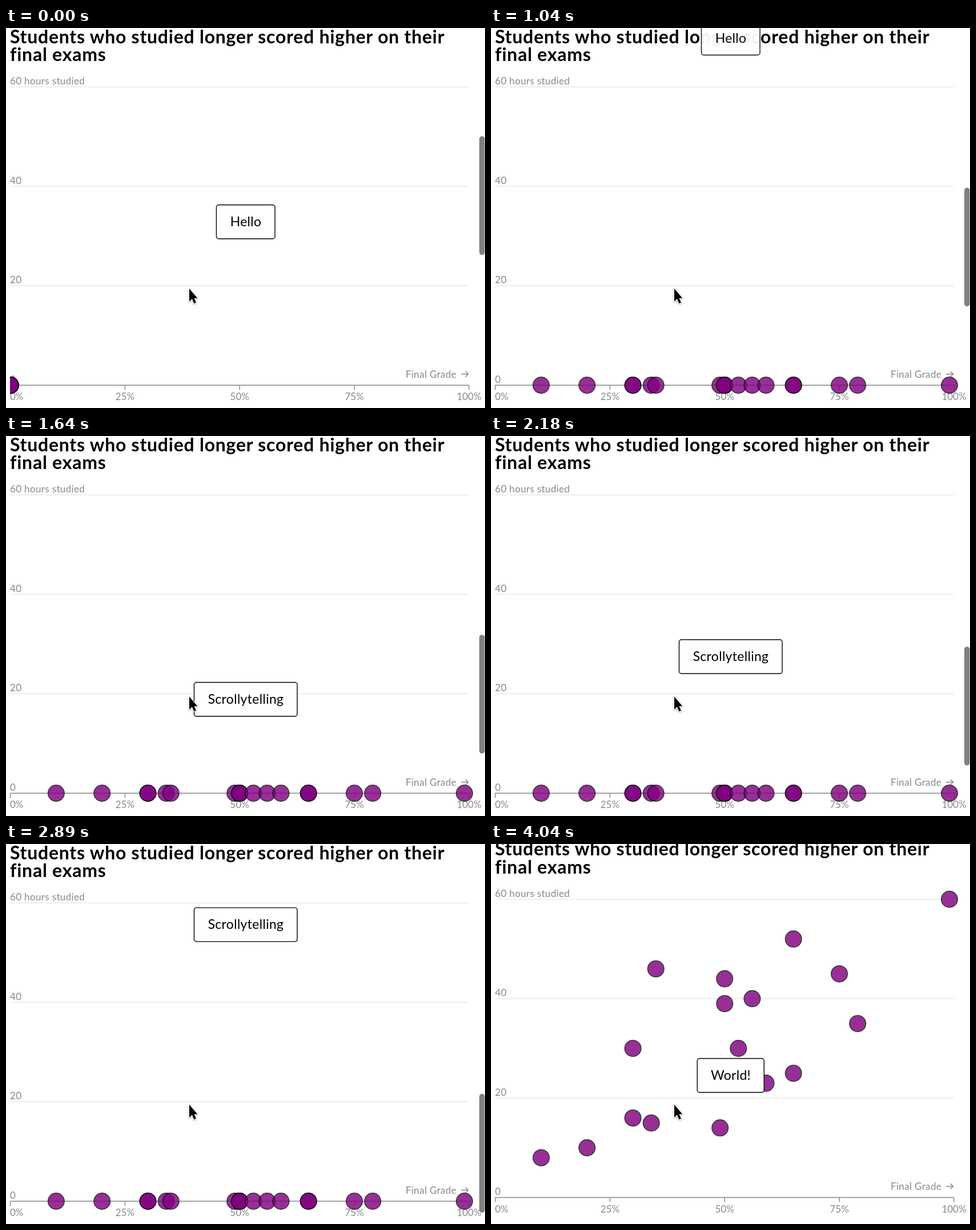
Animation of 839x667 px, one loop 5440 ms. Source, as an HTML page:

```html
<!DOCTYPE html>
<html lang="en">
<head>
<meta charset="utf-8">
<title>Study time and grades</title>
<style>
  html, body { margin: 0; width: 100%; height: 100%; overflow: hidden; background: #fff; }
  svg { display: block; width: 100%; height: 100%; font-family: Lato, "Open Sans", sans-serif; }
  .title { font-size: 32px; font-weight: 700; letter-spacing: .75px; }
  .label { font-size: 17px; fill: #88888c; }
  .spaced { letter-spacing: .35px; }
  .grid { stroke: #e0e0e0; stroke-width: 1.2; }
  .axis { stroke: #85858a; stroke-width: 1.4; fill: none; }
  .dot { fill: purple; stroke: #000; stroke-width: 1.4; opacity: .81; }
  .step rect { fill: #fff; stroke: #000; stroke-width: 1.4; }
  .step text { font-size: 23px; letter-spacing: .3px; text-anchor: middle; }
  .cursor { stroke: #fff; stroke-width: 2.2; stroke-linejoin: round; paint-order: stroke;
            filter: drop-shadow(0 1.5px 1.5px rgba(0, 0, 0, .35)); }
</style>
</head>
<body>
<svg viewBox="0 0 839 667">
  <clipPath id="plot"><rect x="7" y="0" width="832" height="667"/></clipPath>
  <g id="chart">
    <text class="title" x="7" y="26.5">Students who studied longer scored higher on their</text>
    <text class="title" x="7" y="58">final exams</text>
    <g id="axes"></g>
    <text class="label spaced" x="700" y="613.5">Final Grade</text>
    <path class="axis" d="M797 607.5h12.5m-5-5l5 5l-5 5"/>
    <g id="dots" clip-path="url(#plot)"></g>
  </g>
  <g id="steps"></g>
  <rect id="scrollbar" x="829" width="9.5" height="208.5" rx="4.75" fill="#808080"/>
  <path class="cursor" d="M321 457.5v22.5l4.9-4.5l3.5 8l3.6-1.5l-3.4-7.8h5.8z"/>
</svg>
<script>
const LOOP = 5440;
const SPREAD_AT = 1010, RISE_AT = 3025, FADE = 230;
const STEP_GAP = 690, UNPIN_AT = 1307.5;

// [grade, hours]
const students = [
  [10, 8], [20, 10], [30, 30], [30, 16], [34, 15], [35, 46], [49, 14], [50, 44], [50, 39],
  [50, 23], [53, 30], [56, 40], [59, 23], [65, 52], [65, 25], [75, 45], [79, 35], [99, 60]
];

// [ms, scrolled pixels]
const scrollKeys = [
  [0, 0], [5, 0], [250, 50], [505, 50], [1040, 322], [1640, 568], [1855, 568], [2180, 643],
  [2425, 643], [2890, 888], [3000, 968], [3180, 1177], [3320, 1307], [3465, 1307],
  [3540, 1314], [LOOP, 1314]
];

const $ = id => document.getElementById(id);
const gradeX = grade => 7.5 + grade * 8.035;
const hoursY = hours => 627 - hours * 8.725;
const clamp = v => Math.min(1, Math.max(0, v));
const smooth = v => { v = clamp(v); return v * v * (3 - 2 * v); };

$('axes').innerHTML =
  [0, 20, 40, 60].map(h => `
    <path class="${h ? 'grid' : 'axis'}" d="M7.5 ${hoursY(h)}H811"/>
    <text class="label spaced" x="7" y="${hoursY(h) - 4.5}">${h}${h === 60 ? ' hours studied' : ''}</text>`).join('') +
  [0, 25, 50, 75, 100].map(g => `
    <path class="axis" d="M${gradeX(g)} 627v8"/>
    <text class="label" x="${g ? gradeX(g) : 7}" y="653" text-anchor="${g ? 'middle' : 'start'}">${g}%</text>`).join('');

$('dots').innerHTML = '<circle class="dot" r="14.3"/>'.repeat(students.length);

$('steps').innerHTML = [['Hello', 102.6], ['Scrollytelling', 180.6], ['World!', 117]].map(([text, width]) => `
  <g class="step">
    <rect x="${419.8 - width / 2}" y=".5" width="${width}" height="59.5" rx="4"/>
    <text x="420" y="38">${text}</text>
  </g>`).join('');

const dots = [...$('dots').children];
const steps = [...$('steps').children];

function secant(i) {
  const [t0, s0] = scrollKeys[i], [t1, s1] = scrollKeys[i + 1];
  return (s1 - s0) / (t1 - t0);
}

// Speed at a key: zero beside a pause
function speed(i) {
  if (i === 0 || i === scrollKeys.length - 1) return 0;
  const before = secant(i - 1), after = secant(i);
  return before && after ? (before + after) / 2 : 0;
}

function scrollAt(t) {
  const i = scrollKeys.findIndex((key, k) => t < scrollKeys[k + 1][0]);
  const [t0, s0] = scrollKeys[i], [t1, s1] = scrollKeys[i + 1];
  const span = t1 - t0, p = (t - t0) / span, q = 1 - p;
  return s0 + (s1 - s0) * smooth(p) + span * p * q * (speed(i) * q - speed(i + 1) * p);
}

function draw(t) {
  const scroll = scrollAt(t);
  const spread = t >= SPREAD_AT, rise = t >= RISE_AT;

  $('chart').setAttribute('transform', `translate(0 ${-Math.max(0, scroll - UNPIN_AT)})`);
  dots.forEach((dot, i) => {
    const [grade, hours] = students[i];
    dot.setAttribute('cx', gradeX(spread ? grade : 0));
    dot.setAttribute('cy', hoursY(rise ? hours : 0));
  });

  const second = smooth((t - SPREAD_AT) / FADE), third = smooth((t - RISE_AT) / FADE);
  const opacities = [1 - second, second - third, third];
  steps.forEach((step, i) => {
    step.setAttribute('transform', `translate(0 ${310 + i * STEP_GAP - scroll})`);
    step.setAttribute('opacity', opacities[i]);
  });

  $('scrollbar').setAttribute('y', 190 + scroll / 3.575);
  $('scrollbar').setAttribute('opacity', 1 - clamp((t - 3900) / 140));
}

const start = performance.now();
function tick() {
  draw((performance.now() - start) % LOOP);
  requestAnimationFrame(tick);
}
tick();
</script>
</body>
</html>
```
